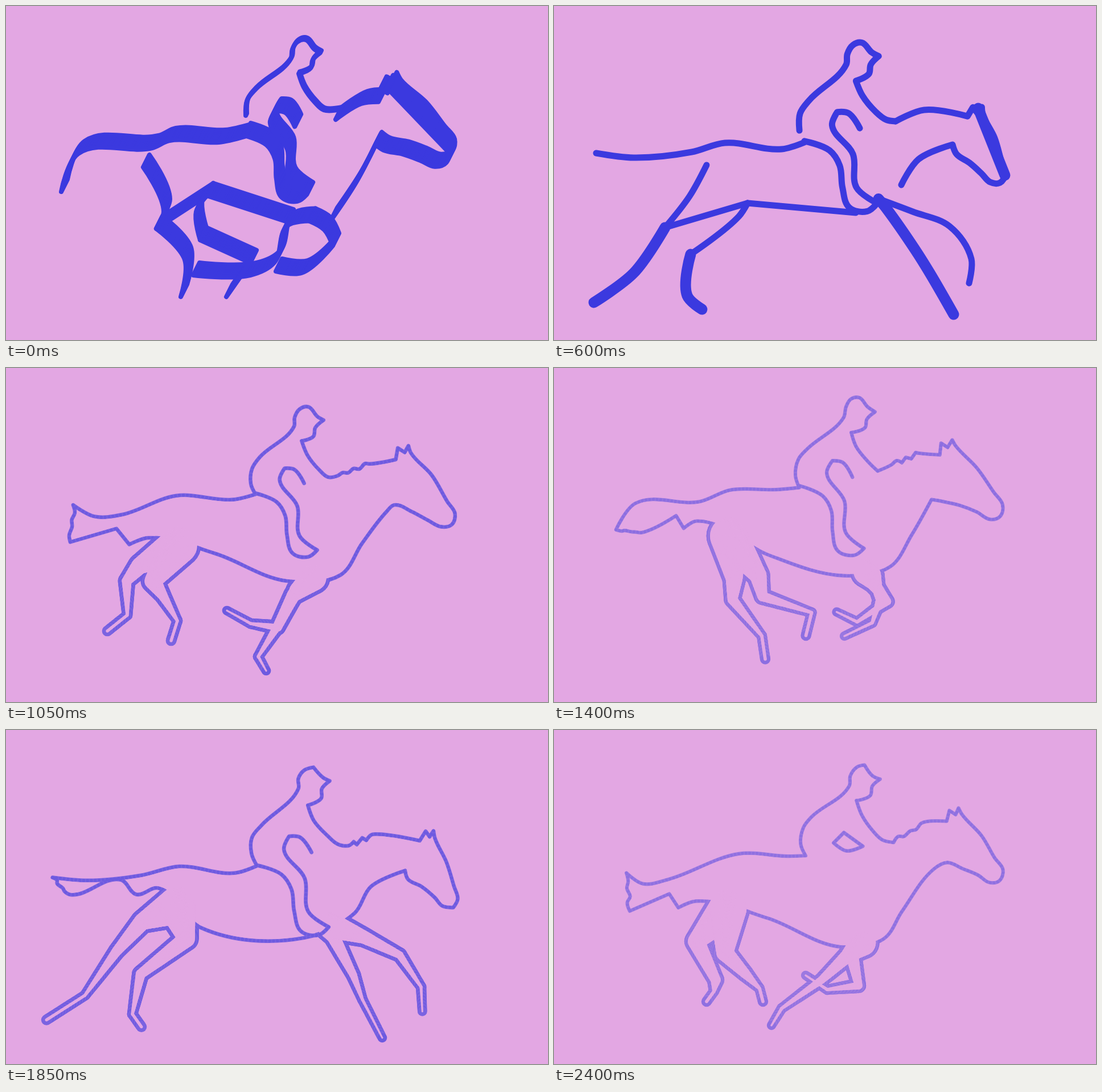
Write an HTML page with a canvas that moves like this. It is 952 px wide and 588 px high and loops after 2450 ms.

```html
<!DOCTYPE html>
<html lang="en">
<head>
<meta charset="utf-8">
<title>Gallop</title>
<style>
html, body { margin: 0; width: 100%; height: 100%; overflow: hidden; background: #e3a7e3; }
canvas { display: block; }
</style>
</head>
<body>
<canvas id="stage" width="952" height="588"></canvas>
<script>
const LOOP = 2450, TICK = 50, STEP = 80, STRIDE = 15.5;
const PAPER = [227, 167, 227], INK = [59, 57, 223];
const W = 952, H = 588;
const ctx = document.getElementById('stage').getContext('2d');
const mask = new OffscreenCanvas(W, H).getContext('2d');
const rgb = c => `rgb(${c.map(Math.round)})`;
const mix = (a, b, t) => a.map((v, i) => v + (b[i] - v) * t);
const add = (p, x, y) => [p[0] + x, p[1] + y];
const points = s => s.split(' ').map(p => p.split(',').map(Number));
const paper = rgb(PAPER), ink = rgb(INK);
for (const c of [ctx, mask]) c.lineCap = c.lineJoin = 'round';

// Per pose: stride phase, marker strength, body anchors, legs of four joints (two hind, two fore).
// Anchors: tail tip, tail, dock, rump, loin, seat, rider's head, withers, crest, poll, nose,
// throat, neck, chest, girth, flank, buttock, tail end.
const poses = [
  [0, .5,
    '108,305 138,238 268,228 298,215 385,218 430,208 527,74 590,178 635,150 680,122 788,235 660,222 625,290 582,355 505,358 364,312 252,262 170,270',
    '288,340 275,370 325,425 318,490 345,340 352,390 440,430 398,490 570,372 585,400 530,448 485,445 505,365 482,430 440,452 340,452'],
  [3, .38,
    '109,267 150,238 242,242 320,213 395,208 434,211 543,68 597,162 650,150 704,138 790,250 667,240 630,300 599,347 510,374 385,345 251,275 136,309',
    '345,400 352,445 405,518 424,535 372,390 380,414 465,431 487,452 550,385 586,422 535,446 508,414 620,364 662,386 678,445 680,492'],
  [4.5, .58,
    '119,265 150,237 252,247 330,214 398,216 437,219 541,70 590,180 650,154 707,144 796,270 668,248 632,305 611,348 515,373 386,348 250,277 127,303',
    '312,392 279,445 294,505 328,532 360,375 386,420 462,463 495,484 620,395 605,425 592,445 545,442 640,376 676,398 712,450 741,484'],
  [7, .6,
    '74,259 140,267 242,257 300,241 400,252 440,240 540,85 600,203 650,183 745,180 792,298 700,244 640,270 610,315 530,364 340,347 268,280 110,290',
    '238,335 195,390 140,470 70,522 325,370 240,437 234,510 260,534 585,358 635,430 660,470 702,543 630,362 695,388 733,445 729,488'],
  [10.5, .75,
    '119,258 152,251 210,245 330,240 410,248 440,240 537,92 612,214 645,182 745,177 804,300 700,266 645,310 630,365 497,372 350,350 258,262 125,291',
    '250,350 192,384 130,450 78,440 270,355 215,385 150,440 105,454 515,395 462,443 422,500 414,535 615,378 670,445 705,495 745,540'],
  [13, .62,
    '119,241 155,260 205,258 300,225 400,232 437,222 530,88 582,190 640,168 700,140 789,258 668,252 625,308 588,365 492,374 368,327 250,300 112,306',
    '235,348 212,375 213,435 178,463 258,375 275,400 301,445 290,480 510,390 478,457 430,450 388,427 505,400 472,462 443,508 457,533'],
  [14.5, .42,
    '127,253 155,270 200,264 325,217 410,222 441,221 544,82 596,198 655,161 705,140 788,248 668,246 612,320 580,367 505,382 376,330 248,300 133,318',
    '250,372 284,440 281,460 268,478 300,392 335,428 361,455 367,478 522,390 535,450 480,457 442,432 515,398 470,440 400,490 382,520']
];

// Shapes drawn between two reference points and fitted to the pose's anchors.
const RIDER_REF = [[440, 220], [543, 82]], HEAD_REF = [[705, 140], [788, 247]];
const riderShape = points('433,200 436,172 452,152 517,97 520,80 530,66 545,63 560,80 571,87 557,100 553,115 531,125 540,150 560,178 576,192');
const riderLeg = points('440,218 480,236 495,262 497,298 506,332 535,340 552,328 520,300 518,245 487,195 497,174 515,177 532,203');
const riderArm = points('490,198 508,180 541,204 512,212');
const headShape = points('690,160 695,141 705,148 711,136 716,148 750,185 775,225 788,246 783,263 765,267 745,256 718,243 690,234');

function fit(shape, [a, b], from, to) {
  const u = b[0] - a[0], v = b[1] - a[1], p = to[0] - from[0], q = to[1] - from[1], d = u * u + v * v;
  const re = (p * u + q * v) / d, im = (q * u - p * v) / d;
  return shape.map(([x, y]) => add(from,
    (x - a[0]) * re - (y - a[1]) * im, (x - a[0]) * im + (y - a[1]) * re));
}

function random(seed) {
  return () => {
    seed = (seed * 1664525 + 1013904223) >>> 0;
    return seed / 4294967296;
  };
}

// Hair: alternating tufts on the way from a to b.
const tufts = (a, b, n, dx, dy) => Array.from({ length: n }, (_, i) => {
  const side = i % 2 ? 1 : -1;
  return add(mix(a, b, (i + 1) / (n + 1)), dx * side, dy * side);
});

// Smooth curve through the points that keeps sharp turns sharp.
function curve(pts, closed) {
  const n = pts.length, path = new Path2D();
  const at = i => closed ? pts[(i + n) % n] : pts[Math.max(0, Math.min(n - 1, i))];
  const dir = i => {
    const [a, b, c] = [at(i - 1), at(i), at(i + 1)];
    const x = b[0] - a[0], y = b[1] - a[1], u = c[0] - b[0], v = c[1] - b[1];
    const l = Math.hypot(x, y), m = Math.hypot(u, v);
    if (!l || !m || (x * u + y * v) / (l * m) < .45) return [0, 0];
    const dx = x / l + u / m, dy = y / l + v / m, d = Math.hypot(dx, dy);
    return [dx / d, dy / d];
  };
  path.moveTo(...pts[0]);
  for (let i = 0; i < (closed ? n : n - 1); i++) {
    const p = at(i), q = at(i + 1), s = dir(i), e = dir(i + 1);
    const h = Math.hypot(q[0] - p[0], q[1] - p[1]) / 3;
    path.bezierCurveTo(p[0] + s[0] * h, p[1] + s[1] * h, q[0] - e[0] * h, q[1] - e[1] * h, ...q);
  }
  if (closed) path.closePath();
  return path;
}

function disc(c, [x, y], r) {
  c.beginPath();
  c.arc(x, y, r, 0, 7);
  c.fill();
}

// Flat brush: the line is swept along a slanted nib.
function brush(pts, w, nib = 0) {
  const path = curve(pts);
  ctx.strokeStyle = ink;
  ctx.lineWidth = w;
  for (let j = 0; j <= nib; j += 2) {
    ctx.setTransform(1, 0, 0, 1, -j / 2, j);
    ctx.stroke(path);
  }
  ctx.resetTransform();
}

// Marker: an even line with darker dabs along it.
function marker(path, w, tone) {
  ctx.strokeStyle = rgb(mix(PAPER, INK, tone));
  ctx.lineWidth = w;
  ctx.stroke(path);
  ctx.setLineDash([.1, w]);
  ctx.strokeStyle = rgb(mix(PAPER, INK, tone + .08));
  ctx.lineWidth = w * .8;
  ctx.stroke(path);
  ctx.setLineDash([]);
}

function limb(c, chain, hind, grow, color) {
  const radii = hind ? [36, 18, 12, 6, 6] : [26, 15, 10, 6, 5];
  for (let i = 0; i < 4; i++) {
    const [p, q] = [chain[i], chain[i + 1]];
    const n = Math.ceil(Math.hypot(q[0] - p[0], q[1] - p[1]) / 2);
    for (let j = 0; j <= n; j++) {
      c.fillStyle = color(j);
      disc(c, mix(p, q, j / n), radii[i] + (radii[i + 1] - radii[i]) * j / n + grow);
    }
  }
}

function poseAt(phase) {
  const i = poses.findLastIndex(p => p[0] <= phase);
  const a = poses[i], b = poses[(i + 1) % poses.length];
  const t = (phase - a[0]) / ((b[0] || STRIDE) - a[0]);
  const blend = n => {
    const to = points(b[n]);
    return points(a[n]).map((p, j) => mix(p, to[j], t));
  };
  const legs = blend(3);
  return {
    tone: a[1] + (b[1] - a[1]) * t,
    body: blend(2),
    legs: [0, 4, 8, 12].map(j => legs.slice(j, j + 4))
  };
}

function drawBrush({ body, legs }, nib) {
  const [tip, tail, dock, rump, loin, seat, face, withers, crest, poll, nose,
    throat, neck, chest, girth, flank, buttock] = body;
  const [a, b, c, d] = legs, shoulder = mix(chest, girth, .5);
  const thin = nib ? 8 : 11, heavy = nib ? 8 : 19;
  const rider = shape => fit(shape, RIDER_REF, seat, face);
  const lines = [
    [tip, tail, dock, rump, loin, seat], [buttock, a[0], a[1]], [flank, a[1]], [flank, b[0], b[1]],
    [flank, girth], [shoulder, ...d], rider(riderLeg),
    [withers, crest, ...fit(headShape, HEAD_REF, poll, nose), throat, neck, chest]
  ];
  for (const line of lines) brush(line, thin, nib);
  for (const line of [a.slice(1), b.slice(1), [shoulder, ...c], [poll, nose]]) brush(line, heavy, nib);
  brush([...rider(riderShape), withers], thin, nib / 4);
}

function drawMarker({ body, legs, tone }, k) {
  const rnd = random(k * 977 + 3), w = 5.5 + tone * 2, wobble = p => add(p, rnd() * 3 - 1.5, rnd() * 3 - 1.5);
  const [tip, tail, dock, rump, loin, seat, face, withers, crest, poll, nose,
    throat, neck, chest, girth, flank, buttock, end] = body;
  const rider = shape => fit(shape, RIDER_REF, seat, face);
  const outline = curve([
    tip, tail, dock, rump, loin, seat, ...rider(riderShape), withers, ...tufts(withers, crest, 5, 0, 3), crest,
    ...fit(headShape, HEAD_REF, poll, nose), throat, neck, chest, girth, flank, buttock,
    add(mix(end, buttock, .75), 0, 8), add(mix(end, buttock, .5), 12, -20), end, ...tufts(end, tip, 4, 2, 0)
  ].map(wobble), true);
  const limbs = (c, grow, color) => legs.forEach((leg, i) => {
    const hind = i < 2, root = hind ? mix(buttock, flank, .45) : mix(chest, girth, .5);
    limb(c, [root, ...leg], hind, grow, color);
  });

  // The inside of body and legs together is cut out of their widened shapes.
  mask.clearRect(0, 0, W, H);
  mask.fillStyle = paper;
  mask.fill(outline);
  mask.globalCompositeOperation = 'destination-out';
  mask.lineWidth = w;
  mask.stroke(outline);
  mask.globalCompositeOperation = 'source-over';
  limbs(mask, -w / 2, () => paper);
  marker(outline, w, tone);
  limbs(ctx, w / 2, j => rgb(mix(PAPER, INK, tone + (j % 3 ? 0 : .08))));
  ctx.drawImage(mask.canvas, 0, 0);

  const bare = k % 10 === 0;
  marker(curve(rider(bare ? riderArm : riderLeg), bare), w, tone);
  if (k === 26) spray(body, legs, rnd);
}

function spray([tip, , , , , seat, , withers, , poll], legs, rnd) {
  const along = (a, b, n, spread, r) => {
    for (let i = 0; i < n; i++)
      disc(ctx, add(mix(a, b, rnd()), (rnd() * 2 - 1) * spread, (rnd() * 2 - 1) * spread), r * (.4 + rnd() * .6));
  };
  ctx.fillStyle = ink;
  along(add(seat, 0, -35), add(seat, 50, 15), 34, 12, 4);
  along(add(seat, 60, 20), add(seat, 65, 65), 24, 13, 3);
  along(add(withers, -40, -40), add(poll, -20, -22), 10, 12, 3);
  along(add(tip, 10, -25), add(tip, 30, -28), 6, 6, 3);
  along(add(legs[2][1], -25, -10), add(legs[2][2], 8, -25), 9, 9, 2.5);
  along(add(legs[3][1], 5, -25), add(legs[3][2], 0, -30), 14, 9, 2.5);
  along([355, 402], [375, 402], 6, 9, 3);
}

let shown = -1;
function frame(now) {
  const t = now % LOOP, k = Math.floor(Math.floor(t / TICK) * TICK / STEP);
  if (k !== shown) {
    shown = k;
    ctx.fillStyle = paper;
    ctx.fillRect(0, 0, W, H);
    const pose = poseAt(k % STRIDE);
    if (k === 0 || k === 7) drawBrush(pose, k ? 0 : 22);
    else drawMarker(pose, k);
  }
  requestAnimationFrame(frame);
}
frame(performance.now());
</script>
</body>
</html>
```
